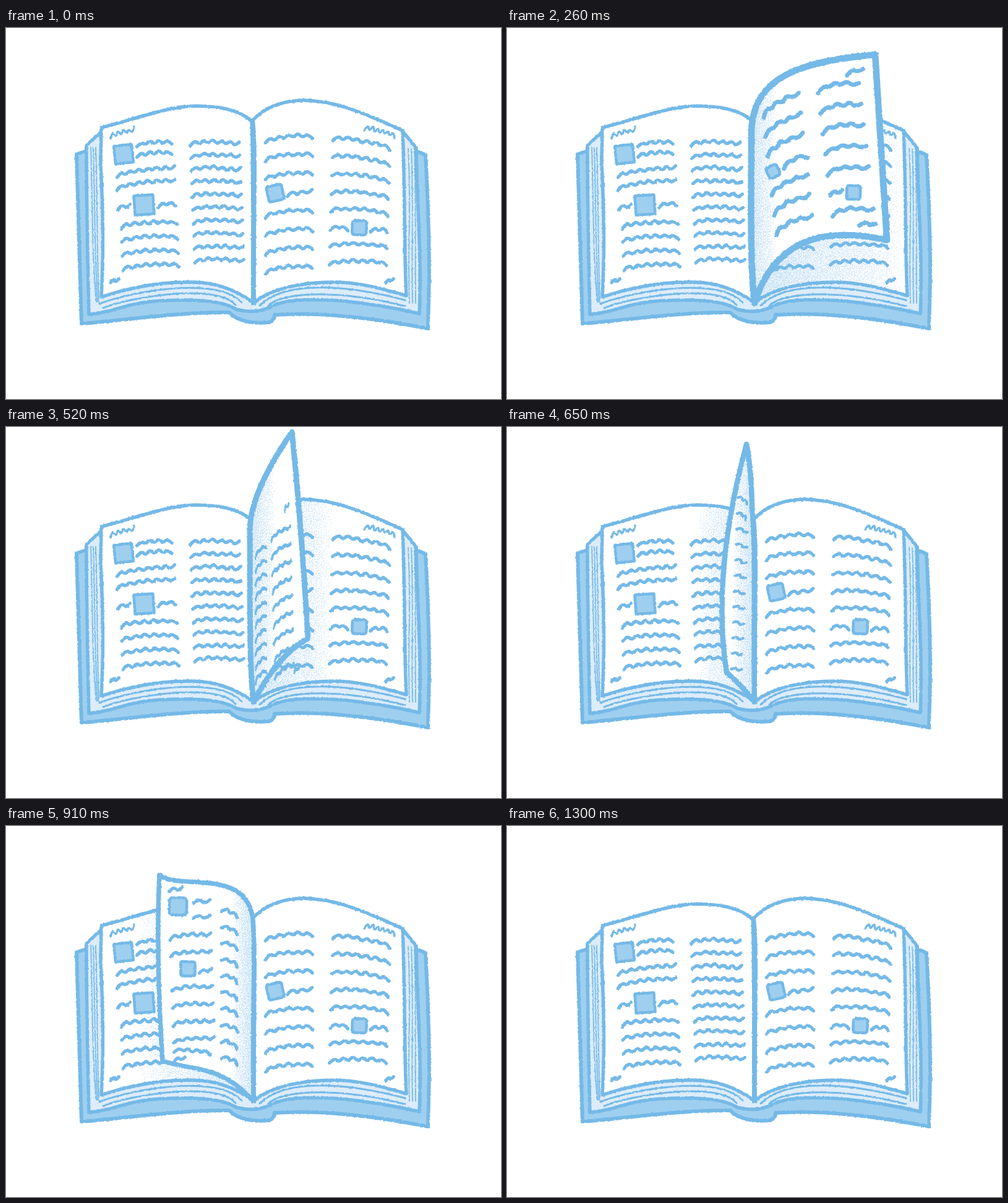
Write an HTML page that moves like this. It is 800 by 600 pixels and loops after 2830 ms.

```html
<!DOCTYPE html>
<html lang="en">
<head>
<meta charset="utf-8">
<title>Page turning</title>
<style>
  html, body { margin: 0; width: 100%; height: 100%; overflow: hidden; background: #fff; }
  svg { display: block; width: 100%; height: 100%; }
  .ink { fill: none; stroke: #74b9e7; stroke-linecap: round; stroke-linejoin: round; }
  .rough { filter: url(#rough); }
  .grain { filter: url(#grain); mix-blend-mode: darken; }
  .pose { visibility: hidden; animation: flash 2830ms step-end infinite; }
  /* one pose lasts 130 of 2830 ms */
  @keyframes flash {
    0% { visibility: visible; }
    4.5936%, 100% { visibility: hidden; }
  }
</style>
</head>
<body>
<svg id="stage" viewBox="0 0 800 600">
  <defs>
    <filter id="rough" filterUnits="userSpaceOnUse" x="0" y="0" width="800" height="600" color-interpolation-filters="sRGB">
      <feTurbulence type="fractalNoise" baseFrequency=".3" numOctaves="1" seed="4"/>
      <feDisplacementMap in="SourceGraphic" scale="3.2" xChannelSelector="R" yChannelSelector="G"/>
    </filter>
    <filter id="grain" filterUnits="userSpaceOnUse" x="0" y="0" width="800" height="600" color-interpolation-filters="sRGB">
      <feTurbulence type="fractalNoise" baseFrequency=".75" numOctaves="2" seed="9"/>
      <feColorMatrix values="0 0 0 0 0  0 0 0 0 0  0 0 0 0 0  2.4 0 0 0 -.7" result="noise"/>
      <feComposite in="SourceAlpha" in2="noise" operator="arithmetic" k2="1" k3="1" k4="-1"/>
      <feComponentTransfer result="dots"><feFuncA type="linear" slope="6"/></feComponentTransfer>
      <feFlood flood-color="#cbe3f6"/>
      <feComposite in2="dots" operator="in"/>
    </filter>
  </defs>
</svg>
<script>
const stage = document.getElementById('stage');
const MID = '#9fcfef', PALE = '#dcecfa';
const SPINE = 400;
const PLAIN = { thick: 5.3, wave: 7.5, amp: 3.8, arch: .16 };
const BROAD = { thick: 6.8, wave: 9.5, amp: 3.8, arch: .38 };
const SMOOTH = { thick: 5.5, wave: 10, amp: 2.8, arch: .25 };
const SMALL = { thick: 4.5, wave: 5, amp: 3, arch: .1 };
const TITLE = { thick: 3.5, wave: 4.4, amp: 5.5, arch: .05 };

const jitter = n => { const v = Math.sin(n * 12.9898) * 43758.5453; return v - Math.floor(v); };
const path = (d, width, fill = 'none') =>
  `<path class="ink" d="${d}" stroke-width="${width}" style="fill:${fill}"/>`;

// A wavy, slightly arched line standing in for a row of writing.
function scribble(x1, y1, x2, y2, { thick, wave, amp, arch }) {
  const len = Math.hypot(x2 - x1, y2 - y1);
  const count = Math.max(3, Math.round(len / wave));
  const nx = (y1 - y2) / len, ny = (x2 - x1) / len;
  const points = Array.from({ length: count + 1 }, (_, i) => {
    const t = i / count;
    const off = (i % 2 ? -amp : amp) * (.65 + .6 * jitter(i + x1 + y1)) - len * arch * t * (1 - t);
    return [x1 + (x2 - x1) * t + nx * off, y1 + (y2 - y1) * t + ny * off];
  });
  let d = `M${points[0]}`;
  for (let i = 1; i < count; i++) {
    const [p, q] = [points[i], points[i + 1]];
    d += `Q${p} ${i === count - 1 ? q : [(p[0] + q[0]) / 2, (p[1] + q[1]) / 2]}`;
  }
  return path(d, thick);
}

const picture = (x, y, size, turn, round = 3) => ({ x, y, size, turn, round });
const drawPicture = ({ x, y, size, turn, round }) =>
  `<rect class="ink" x="${x - size / 2}" y="${y - size / 2}" width="${size}" height="${size}" rx="${round}"
    transform="rotate(${turn} ${x} ${y})" stroke-width="4.5" style="fill:${MID}"/>`;

// Evenly spaced rows; each one shifts by drift and changes its rise by tilt.
// Rows leave room for the pictures they run into.
function rows(style, pictures, x, y, width, rise, count = 1, pitch = 0, drift = 0, tilt = 0) {
  let out = '';
  for (let i = 0; i < count; i++) {
    const left = x + drift * i, right = left + width;
    const yAt = px => y + pitch * i + (rise + tilt * i) * (px - left) / width;
    let parts = [[left, right]];
    for (const p of pictures) {
      const room = p.size / 2 + 7;
      if (Math.abs(yAt(p.x) - p.y) > p.size / 2 + 2) continue;
      if (p.x + room < left || p.x - room > right) continue;
      parts = [[left, p.x - room], [p.x + room, right]];
    }
    for (const [a, b] of parts) if (b - a > 11) out += scribble(a, yAt(a), b, yAt(b), style);
  }
  return out;
}

const writing = (style, pictures, ...blocks) =>
  blocks.map(b => rows(style, pictures, ...b)).join('') + pictures.map(drawPicture).join('');

const leftText = rows(TITLE, [], 168, 173, 40, -8) +
  writing(PLAIN, [picture(190, 204, 29, -6, 1), picture(223, 286, 31, -4, 1)],
    [211, 189, 57, -4, 2, 17], [179, 238, 94, -11, 2, 20.5], [181, 290, 93, -5],
    [186, 321, 90, -6, 4, 22.5, 1], [169, 409, 13, 0], [298, 186, 79, 2, 10, 21.1, .8]);

const rightText = rows(TITLE, [], 580, 160, 49, 14) +
  writing(PLAIN, [picture(435, 267, 25, -12), picture(571, 323, 23, 2, 4)],
    [419, 182, 76, -8, 8, 30.2], [529, 178, 92, 16, 8, 28.9, -.9, -2.3], [614, 408, 12, 1]);

const liftedText = writing(BROAD, [picture(430, 232, 19, -25, 4), picture(560, 266, 22, 2)],
  [413, 142, 60, -34, 7, 31.6, 3.5, 1.2], [502, 101, 67, -9, 7, 33.2, 4, .8],
  [549, 73, 27, -4], [570, 316, 25, 4]);

const steepText = writing(SMOOTH, [],
  [407, 148, 35, -22, 11, 20.8], [458, 115, 64, -29, 9, 25.5, 1.5], [502, 63, 15, -10], [533, 299, 17, -6]);

const thinText = writing(SMALL, [], [375, 112, 14, 11, 12, 25.2, -1, -.5]);

const bentText = writing(PLAIN, [picture(278, 130, 28, 2, 5), picture(294, 231, 23, 1)],
  [264, 103, 21, 0], [304, 121, 25, 3, 2, 24.5], [265, 180, 66, -3, 7, 28, 1],
  [272, 363, 58, 4], [272, 377, 17, 1], [350, 134, 25, 11, 10, 26.5]);

const landingText = writing(PLAIN, [picture(219, 151, 29, -3, 5), picture(248, 240, 25, -6)],
  [205, 121, 28, -4], [246, 139, 35, 1, 2, 21], [211, 192, 69, -4, 7, 28], [206, 385, 19, -1],
  [314, 143, 62, 15, 10, 25.3, -1.2]);

const LEFT_PAGE = 'M154 161C200 150 260 127 305 126Q373 126 398 152L400 445C375 425 340 411 300 411C250 410 200 420 154 435C158 370 157 300 153 220Z';
const RIGHT_PAGE = 'M398 150C420 125 455 117 480 117C540 117 600 148 641 166C645 260 643 350 647 433C610 422 570 411 530 411C480 411 430 420 400 445Z';

// Edges of the leaves below the open page.
let leaves = '';
for (let i = 0; i < 3; i++) {
  leaves += path(`M${137 + 4 * i} 193C${140 + 4 * i} 290 ${139 + 4 * i} 370 ${146 + 2 * i} 443`, 1.8);
  leaves += path(`M${650 + 5 * i} 195C${655 + 4 * i} 280 ${649 + 6 * i} 360 ${652 + 5 * i} 445`, 1.8);
}
for (let i = 0; i < 2; i++) {
  leaves += path(`M${151 + 6 * i} ${446 + 7 * i}C200 ${427 + 8 * i} 340 ${400 + 12 * i} ${381 - 10 * i} ${444 + 4 * i}`, 3);
  leaves += path(`M${410 + 14 * i} 449C450 ${408 + 16 * i} 550 ${415 + 10 * i} 645 ${440 + 10 * i}`, 3);
}

const book =
  path('M114 204L130 199H663L678 205C682 280 684 350 684 400L682 486C600 470 510 458 434 464Q434 474 424 476C405 478 375 476 361 460C280 459 200 472 122 478Z', 6, MID) +
  path('M154 168L130 190C130 290 132 380 134 463C175 460 190 445 250 441Q345 436 372 455Q400 463 426 452C450 438 490 438 540 441Q610 448 668 462C672 370 664 280 663 194L641 167Z', 5.5, PALE) +
  leaves + path(LEFT_PAGE, 5.5, '#fff') + path(RIGHT_PAGE, 5.5, '#fff') +
  path('M398 150C404 200 399 300 400 445', 8) + leftText + rightText;

const move = (matrix, content) => `<g transform="matrix(${matrix})">${content}</g>`;

// A turning leaf: outer corners plus the bends of its upper, outer and lower edges.
const poses = [
  { top: [645, 98], bottom: [656, 393], fold: [397, 165], upper: '410 75 510 78', outer: '652 250', lower: '560 365 450 365',
    width: 8, text: move('1 -.12 0 .97 5 27', rightText) },
  { top: [595, 43], bottom: [614, 343], fold: [395, 170], upper: '396 80 470 55', outer: '604 190', lower: '500 318 430 350',
    width: 10.5, text: liftedText },
  { top: [531, 20], bottom: [569, 302], fold: [394, 160], upper: '398 115 430 80', outer: '543 110', lower: '490 325 425 365',
    width: 10, text: steepText + path('M552 68Q575 69 592 73M557 95Q590 97 619 108M555 117Q580 118 600 123', 5.5) },
  { top: [462, 8], bottom: [488, 342], fold: [394, 165], upper: '396 120 420 70', outer: '476 140', lower: '455 360 425 395',
    width: 9, text: move('.5 .176 0 1.08 199 -22', steepText) },
  { top: [387, 28], bottom: [355, 397], fold: [396, 130], upper: '396 100 392 50', outer: '330 240', lower: '365 405 385 425',
    width: 8.5, text: thinText },
  { top: [308, 46], bottom: [305, 390], fold: [399, 165], upper: '395 70 340 85', outer: '297 220', lower: '340 400 375 412',
    width: 7.5, text: move('.59 .2 0 1.12 164 -14', bentText) },
  { top: [248, 79], bottom: [253, 380], fold: [399, 150], upper: '388 65 275 105', outer: '242 210', lower: '310 398 345 385',
    width: 7.5, text: bentText },
  { top: [192, 107], bottom: [193, 404], fold: [399, 150], upper: '350 75 275 87', outer: '184 230', lower: '270 388 350 390',
    width: 7.5, text: landingText },
  { top: [172, 134], bottom: [174, 420], fold: [399, 152], upper: '350 95 270 107', outer: '166 250', lower: '250 398 345 395',
    width: 6.5, text: move('.94 0 0 .98 24 -20', leftText) },
];

// Grainy shadow over a strip of the given clip, thinning from x1 to x2.
const shade = (id, clip, x1, x2) => `
  <linearGradient id="${id}" gradientUnits="userSpaceOnUse" x1="${x1}" y1="0" x2="${x2}" y2="0">
    <stop stop-opacity=".8"/><stop offset=".8" stop-opacity=".42"/><stop offset="1" stop-opacity=".1"/></linearGradient>
  <g class="grain" clip-path="url(#${clip})"><rect x="${Math.min(x1, x2)}" width="${Math.abs(x2 - x1)}" height="600" fill="url(#${id})"/></g>`;

const clip = (id, d) => `<clipPath id="${id}"><path d="${d}"/></clipPath>`;

function drawPose({ top, bottom, fold, upper, outer, lower, width, text }, i) {
  const side = bottom[0] > SPINE ? 1 : -1;
  const rim = side > 0 ? Math.max(top[0], bottom[0]) : Math.min(top[0], bottom[0]);
  const reach = 50 - Math.abs(rim - SPINE) * .12;
  const spine = side > 0 ? '392 380 395 250' : '398 300 403 200';
  const sheet = `M400 445C${spine} ${fold}C${upper} ${top}Q${outer} ${bottom}C${lower} 400 445Z`;
  return `
  <g class="pose" style="animation-delay:${130 * (i + 1) - 2830}ms">
    ${clip('sheet' + i, sheet)}
    ${shade('cast' + i, side > 0 ? 'right' : 'left', SPINE, rim + side * reach)}
    <path class="rough" d="${sheet}" fill="#fff"/>
    ${shade('gutter' + i, 'sheet' + i, SPINE - 4, SPINE + side * 34)}
    <g class="rough">${path(sheet, width)}${text}</g>
  </g>`;
}

stage.insertAdjacentHTML('beforeend',
  clip('left', LEFT_PAGE) + clip('right', RIGHT_PAGE) + `<g class="rough">${book}</g>` + poses.map(drawPose).join(''));
</script>
</body>
</html>
```
